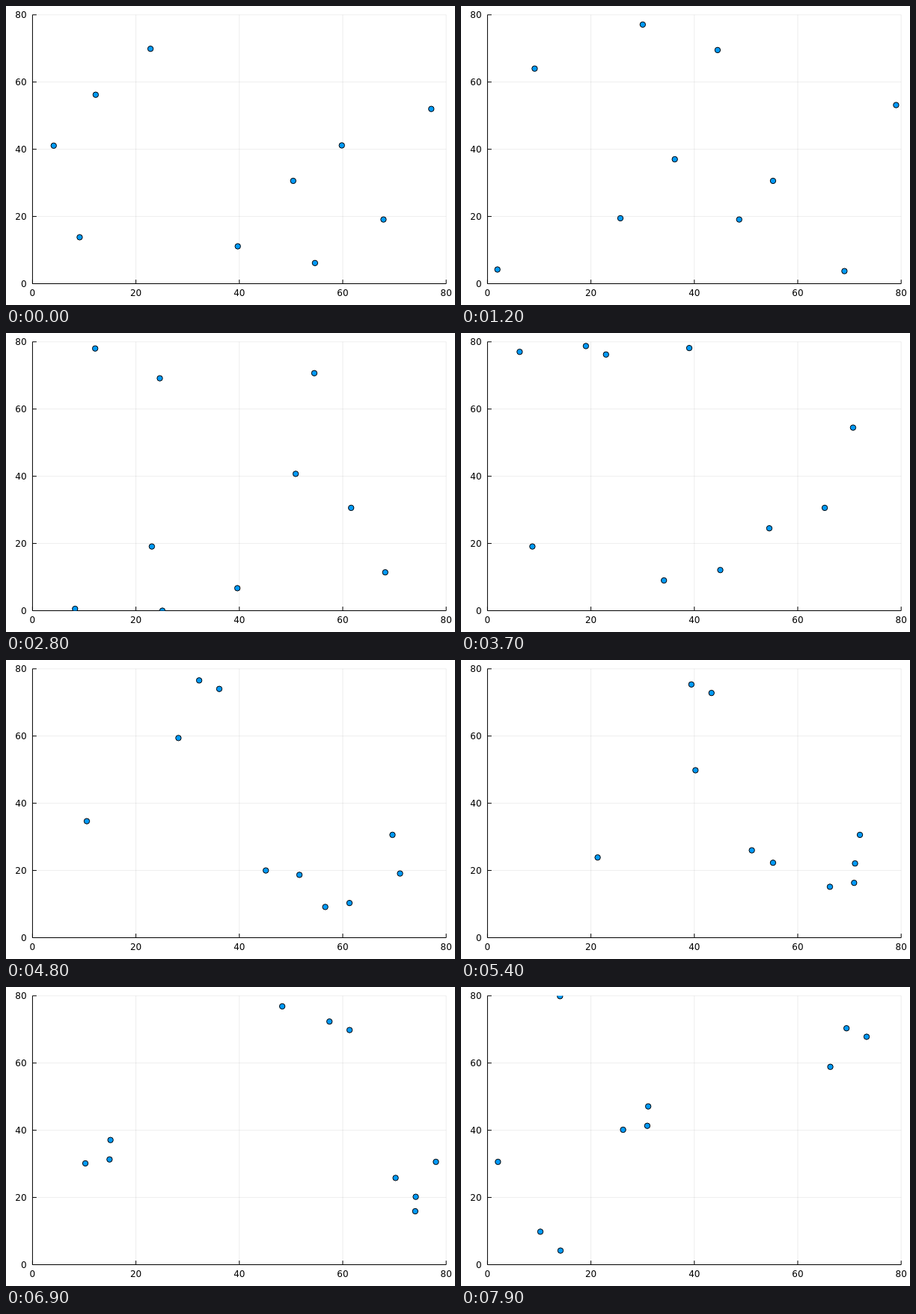
These frames come from a looping animation (600 by 400 pixels, 8 s). An HTML page with a canvas:

```html
<!DOCTYPE html>
<html lang="en">
<head>
<meta charset="utf-8">
<title>Moving points</title>
<style>
  html, body { margin: 0; width: 100%; height: 100%; overflow: hidden; background: #fff; }
  canvas { display: block; width: 600px; height: 400px; }
</style>
</head>
<body>
<canvas id="stage" width="600" height="400"></canvas>
<script>
const ctx = document.getElementById("stage").getContext("2d");
const SIZE = 80, STEP_MS = 100, STEPS = 80;
const LEFT = 35.43, RIGHT = 588.19, TOP = 11.81, BOTTOM = 371.5;
const TICKS = [0, 20, 40, 60, 80];

// Start position and velocity per step; a point that meets a leader
// takes over the leader's velocity from step `turn` on.
const points = [
  { x: 4.1, y: 41.07, vx: 1.8, vy: -1.8 },
  { x: 9.12, y: 13.82, vx: -0.6, vy: -0.8, turn: 17, leader: 6 },
  { x: 12.22, y: 56.22, vx: 2, vy: -1.6 },
  { x: 22.82, y: 69.9, vx: 0.6, vy: 0.6, turn: 62, leader: 2 },
  { x: 39.7, y: 11.12, vx: 0.4, vy: -1.8, turn: 46, leader: 7 },
  { x: 50.42, y: 30.6, vx: 0.4, vy: 0 },
  { x: 54.63, y: 6.15, vx: 1.2, vy: -0.2 },
  { x: 59.82, y: 41.15, vx: 1.6, vy: 1 },
  { x: 67.88, y: 19.1, vx: -1.6, vy: 0, turn: 51, leader: 7 },
  { x: 77.12, y: 52, vx: 1, vy: 1, turn: 61, leader: 2 }
];

const px = x => LEFT + x * (RIGHT - LEFT) / SIZE;
const py = y => BOTTOM - y * (BOTTOM - TOP) / SIZE;
const wrap = v => ((v % SIZE) + SIZE) % SIZE;

function line(x1, y1, x2, y2) {
  ctx.beginPath();
  ctx.moveTo(x1, y1);
  ctx.lineTo(x2, y2);
  ctx.stroke();
}

function drawAxes() {
  ctx.lineWidth = 1;
  ctx.strokeStyle = "rgba(0,0,0,0.07)";
  for (const v of TICKS) {
    line(px(v), TOP, px(v), BOTTOM);
    line(LEFT, py(v), RIGHT, py(v));
  }
  ctx.strokeStyle = "#000";
  line(LEFT, TOP, LEFT, BOTTOM);
  line(LEFT, BOTTOM, RIGHT, BOTTOM);
  for (const v of TICKS) {
    line(px(v), BOTTOM, px(v), BOTTOM - 5.4);
    line(LEFT, py(v), LEFT + 5.4, py(v));
  }
  ctx.fillStyle = "#000";
  ctx.font = '12px "DejaVu Sans", sans-serif';
  for (const v of TICKS) {
    ctx.textAlign = "center";
    ctx.fillText(v, px(v), 387.5);
    ctx.textAlign = "right";
    ctx.fillText(v, 27.6, py(v) + 4.4);
  }
}

function place(p, step) {
  const before = Math.min(step, p.turn ?? step), after = step - before;
  const lead = points[p.leader] ?? p;
  return [
    px(wrap(p.x + p.vx * before + lead.vx * after)),
    py(wrap(p.y + p.vy * before + lead.vy * after))
  ];
}

function drawPoints(step) {
  ctx.save();
  ctx.beginPath();
  ctx.rect(LEFT, TOP, RIGHT - LEFT, BOTTOM - TOP);
  ctx.clip();
  ctx.fillStyle = "#009af9";
  ctx.strokeStyle = "#000";
  ctx.lineWidth = 1;
  for (const p of points) {
    const [x, y] = place(p, step);
    ctx.beginPath();
    ctx.arc(x, y, 3.7, 0, 2 * Math.PI);
    ctx.fill();
    ctx.stroke();
  }
  ctx.restore();
}

function frame() {
  const step = Math.floor(performance.now() / STEP_MS) % STEPS;
  ctx.fillStyle = "#fff";
  ctx.fillRect(0, 0, 600, 400);
  drawAxes();
  drawPoints(step);
  requestAnimationFrame(frame);
}
frame();
</script>
</body>
</html>
```
